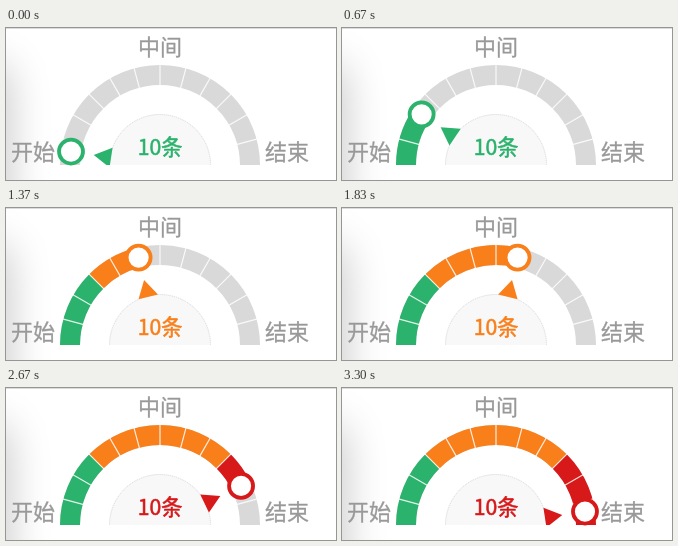
Recreate the animation shown at these times as an HTML page. Size 330 by 152 pixels, loop 3330 ms.

```html
<!DOCTYPE html>
<html lang="zh">
<head>
<meta charset="utf-8">
<style>
html, body { margin: 0; width: 100%; height: 100%; overflow: hidden; background: #fff; }
.stage { position: relative; width: 330px; height: 152px; overflow: hidden; }
.shade { position: absolute; left: -40px; top: 42px; width: 38px; height: 180px; border-radius: 8px; box-shadow: 0 0 42px 5px rgba(0, 0, 0, .22); }
.rule { position: absolute; left: 0; top: 0; width: 100%; height: 1px; background: #dcdcdc; }
svg { position: absolute; left: 0; top: 0; display: block; }
text { font: 22px "Noto Sans CJK SC", "Noto Sans CJK", sans-serif; text-anchor: middle; fill: #999; stroke: #999; stroke-width: .3px; }
#count { font-size: 21.2px; stroke-width: .55px; }
</style>
</head>
<body>
<div class="stage">
  <div class="shade"></div>
  <div class="rule"></div>
  <svg width="330" height="152" viewBox="0 0 330 152">
    <clipPath id="upper"><rect width="330" height="137"/></clipPath>
    <g clip-path="url(#upper)">
      <g id="bands" fill="none" stroke-width="20"></g>
      <path id="ticks" stroke="#fff" stroke-width="1.2" stroke-opacity=".85"/>
      <circle cx="154" cy="137" r="50.5" fill="#f8f8f8" stroke="#d4d4d4" stroke-width="1" stroke-dasharray="1 1"/>
      <path id="pointer"/>
    </g>
    <circle id="knob" r="12" fill="#fff" stroke-width="3.8"/>
    <text x="154" y="26.7">中间</text>
    <text x="27" y="131.7">开始</text>
    <text x="281" y="131.7">结束</text>
    <text id="count" x="154" y="127">10条</text>
  </svg>
</div>
<script>
const LOOP = 3330, START = 100, SWEEP = 3000;
const CX = 154, CY = 137, R = 90, MARGIN = 8.6;
const zones = [
  { from: 0, to: 45, color: '#2bb26c' },
  { from: 45, to: 135, color: '#f97f1b' },
  { from: 135, to: 180, color: '#d7191a' }
];
const $ = id => document.getElementById(id);
const clamp = (v, lo, hi) => Math.min(hi, Math.max(lo, v));

// Angles run clockwise from the left end of the gauge.
function polar(deg, r, side = 0) {
  const a = deg * Math.PI / 180, c = Math.cos(a), s = Math.sin(a);
  return [CX - r * c + side * s, CY - r * s - side * c].map(v => v.toFixed(2));
}
const arc = (a, b) => b > a ? `M${polar(a, R)}A${R} ${R} 0 0 1 ${polar(b, R)}` : '';

function addBand(color) {
  const p = document.createElementNS('http://www.w3.org/2000/svg', 'path');
  p.setAttribute('stroke', color);
  return $('bands').appendChild(p);
}

addBand('#d9d9d9').setAttribute('d', arc(0, 180));
for (const z of zones) z.path = addBand(z.color);

let ticks = '';
for (let a = 15; a < 180; a += 15) ticks += `M${polar(a, 79)}L${polar(a, 101)}`;
$('ticks').setAttribute('d', ticks);

function draw(now) {
  const t = now % LOOP;
  const angle = clamp((t - START) / SWEEP, 0, 1) * 180;
  const held = clamp(angle, MARGIN, 180 - MARGIN);
  for (const z of zones) z.path.setAttribute('d', arc(z.from, Math.min(angle, z.to)));

  const { color } = zones.find(z => angle <= z.to);
  const [x, y] = polar(held, R);
  $('knob').setAttribute('cx', x);
  $('knob').setAttribute('cy', y);
  $('knob').setAttribute('stroke', color);
  $('pointer').setAttribute('d', `M${polar(held, 67)}L${polar(held, 49.5, 10)}L${polar(held, 49.5, -10)}Z`);
  $('pointer').setAttribute('fill', color);
  $('count').style.fill = $('count').style.stroke = color;
}

const begin = performance.now();
function tick() {
  draw(performance.now() - begin);
  requestAnimationFrame(tick);
}
tick();
</script>
</body>
</html>
```
